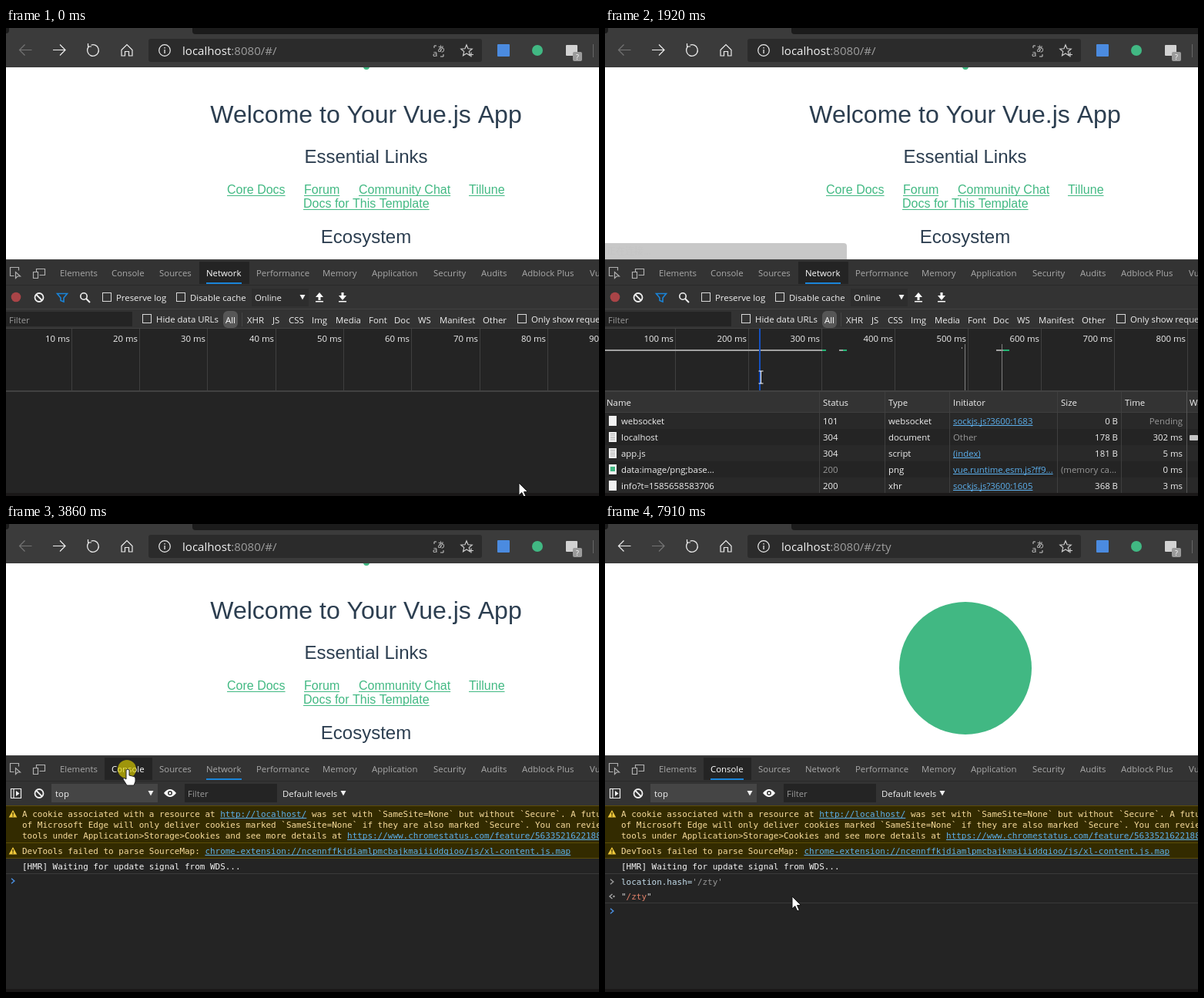
Recreate the animation shown at these times as an HTML page with a canvas. Size 770x607 px, loop 8 s.

```html
<!DOCTYPE html>
<html lang="en">
<head>
<meta charset="utf-8">
<title>Hash change demo</title>
<style>
html, body { margin: 0; width: 100%; height: 100%; overflow: hidden; background: #242424; }
canvas { display: block; }
</style>
</head>
<body>
<canvas id="stage" width="770" height="607"></canvas>
<script>
const ctx = document.getElementById('stage').getContext('2d');
const LOOP = 8000;
const UI = '11.4px "Open Sans", sans-serif';
const URL_FONT = '15.1px "Open Sans", sans-serif';
const MONO = '10.96px "DejaVu Sans Mono", monospace';
const CJK = '12px "Noto Sans CJK SC", "Noto Sans CJK", sans-serif';
const page = size => `${size}px "Liberation Sans", Arial, sans-serif`;
const LIGHT = '#f0f0f0', DIM = '#989898', BAR = '#333333', DARK = '#242424', LINE = '#3f3f3f';
const GREEN = '#41b883', LINK = '#5cb0ee';

// Labels only: a shortened row name and an extension id shown in the console
const IMAGE_LABEL = ['data', 'image/png;base...'].join(':');
const EXTENSION = ['ncennffk', 'jdiamlpm', 'cbajkmai', 'iiddgioo'].join('');

// Cursor moves: start, last step, number of steps, end point
const MOVES = [
  [70, 450, 6, 113, 36],
  [990, 1458, 7, 200, 374],
  [1536, 1770, 4, 203, 470],
  [1840, 1918, 2, 202, 453],
  [1996, 2620, 9, 83, 362],
  [2780, 3020, 4, 43, 350],
  [3248, 3710, 7, 157, 318],
  [4190, 4560, 6, 243, 483]
];
const CLICKS = [[760, 113, 36], [3170, 43, 350], [3860, 157, 318]];

const ROWS = {
  socket: ['websocket', '101', 'websocket', 'sockjs.js?3600:1683', '0 B', 'Pending'],
  doc: ['localhost', '304', 'document', 'Other', '178 B', '302 ms'],
  app: ['app.js', '304', 'script', '(index)', '181 B', '5 ms'],
  image: [IMAGE_LABEL, '200', 'png', 'vue.runtime.esm.js?ff9...', '(memory ca...', '0 ms'],
  info: ['info?t=1585658583706', '200', 'xhr', 'sockjs.js?3600:1605', '368 B', '3 ms']
};
const TABS = [['Elements', 70], ['Console', 137], ['Sources', 199], ['Network', 260], ['Performance', 325],
  ['Memory', 411], ['Application', 475], ['Security', 555], ['Audits', 617], ['Adblock Plus', 670], ['Vue', 758]];
const TYPES = [['XHR', 313], ['JS', 346], ['CSS', 367], ['Img', 397], ['Media', 428], ['Font', 471],
  ['Doc', 504], ['WS', 535], ['Manifest', 563], ['Other', 619]];

const between = (t, a, b) => t >= a && t < b;
const ease = f => f * f * (3 - 2 * f);

function rect(x, y, w, h, color, r = 0) {
  ctx.fillStyle = color;
  ctx.beginPath();
  ctx.roundRect(x, y, w, h, r);
  ctx.fill();
}

function disc(x, y, r, color) {
  ctx.fillStyle = color;
  ctx.beginPath();
  ctx.arc(x, y, r, 0, 7);
  ctx.fill();
}

function ring(x, y, r, color, width = 1.2, from = 0, to = 7) {
  ctx.strokeStyle = color;
  ctx.lineWidth = width;
  ctx.beginPath();
  ctx.arc(x, y, r, from, to);
  ctx.stroke();
}

// d is SVG path syntax, drawn relative to x, y
function path(d, x, y, { fill, stroke, width = 1.2 }) {
  const p = new Path2D(d);
  ctx.save();
  ctx.translate(x, y);
  if (fill) { ctx.fillStyle = fill; ctx.fill(p); }
  if (stroke) { ctx.strokeStyle = stroke; ctx.lineWidth = width; ctx.stroke(p); }
  ctx.restore();
}

function star(x, y, r, color) {
  ctx.strokeStyle = color;
  ctx.lineWidth = 1.2;
  ctx.beginPath();
  for (let k = 0; k < 10; k++) {
    const a = k * Math.PI / 5 - Math.PI / 2, q = k % 2 ? r * .45 : r;
    ctx.lineTo(x + q * Math.cos(a), y + q * Math.sin(a));
  }
  ctx.closePath();
  ctx.stroke();
}

function text(s, x, y, color = LIGHT, font = UI, align = 'left') {
  ctx.font = font;
  ctx.fillStyle = color;
  ctx.textAlign = align;
  ctx.fillText(s, x, y);
  return ctx.measureText(s).width;
}

function link(s, x, y, color = LINK, font = UI, gap = 1) {
  const w = text(s, x, y, color, font);
  rect(x, y + gap, w, 1, color);
  return w;
}

function checkbox(x, y) {
  ctx.strokeStyle = '#d8d8d8';
  ctx.lineWidth = 1;
  ctx.strokeRect(x + .5, y + .5, 11, 11);
}

function arrowDown(x, y) {
  path('M -3.5 -3 H 3.5 L 0 3.5 Z', x, y, { fill: LIGHT });
}

function cursorAt(t) {
  let x = 666, y = 590;
  for (const [start, end, n, tx, ty] of MOVES) {
    if (t < start) break;
    const i = Math.floor((t - start) / ((end - start) / (n - 1)) + 1e-6);
    const f = ease(Math.min(1, (i + 1) / n));
    x += (tx - x) * f;
    y += (ty - y) * f;
  }
  return { x, y };
}

function drawPage(moved) {
  rect(0, 51, 770, 249, '#fff');
  if (moved) {
    disc(468, 187, 86, GREEN);
    return;
  }
  disc(468, 50, 4, GREEN);
  const ink = '#2c3e50', green = '#42b983';
  text('Welcome to Your Vue.js App', 467.5, 123, ink, page(32), 'center');
  text('Essential Links', 467.5, 175, ink, page(24), 'center');
  text('Ecosystem', 467.5, 279, ink, page(24), 'center');
  const links = [['Core Docs', 287, 215], ['Forum', 387, 215], ['Community Chat', 458, 215],
    ['Tillune', 601, 215], ['Docs for This Template', 386, 233]];
  for (const [s, x, y] of links) link(s, x, y, green, page(16), 2);
}

function drawBrowser(t, moved) {
  const on = '#ececec', off = '#747474';
  rect(0, 0, 770, 51, '#3b3b3b');
  rect(242, 0, 528, 8, '#1b1b1b', [0, 0, 0, 4]);
  rect(0, 0, 4, 7, '#1b1b1b', [0, 0, 4, 0]);
  const arrow = 'M 8 0 H -8 M -1 -7 L -8 0 L -1 7';
  path(arrow, 25.5, 28.5, { stroke: moved ? on : off });
  ctx.save();
  ctx.translate(69, 28.5);
  ctx.scale(-1, 1);
  path(arrow, 0, 0, { stroke: moved ? off : on });
  ctx.restore();
  if (between(t, 760, 1770)) {
    path('M -6 -6 L 6 6 M 6 -6 L -6 6', 113, 29, { stroke: on });
  } else {
    ring(113, 29, 7.3, on, 1.3, -1.9, 3.95);
    path('M -6.5 -8 V -4 H -2', 113, 28, { stroke: on });
  }
  path('M -7 0 L 0 -7 L 7 0 V 7.5 H 2.5 V 2 H -2.5 V 7.5 H -7 Z', 157, 28.5, { stroke: on });

  rect(185, 14, 433, 30, '#2b2b2b', 3);
  ring(206, 29, 7.3, on);
  rect(205.4, 28, 1.3, 5, on);
  rect(205.4, 25, 1.3, 1.6, on);
  const w = text('localhost', 229, 35, '#f2f2f2', URL_FONT);
  text(':8080/#/' + (moved ? 'zty' : ''), 229 + w, 35, '#9d9d9d', URL_FONT);
  text('a', 554, 37, '#ccc', UI);
  text('あ', 560, 31, '#ccc', '10px "Noto Sans CJK JP", "Noto Sans CJK", sans-serif');
  path('M 556 26 V 23 H 559 M 568 34 V 37 H 564', 0, 0, { stroke: '#ccc', width: 1 });
  star(598, 29.5, 7.6, '#ccc');
  path('M 3 5 H 9 M 6 2 V 8', 598, 29.5, { stroke: '#ccc' });

  rect(638, 21, 16, 16, '#4b8be0', 1);
  disc(690, 29, 7, between(t, 760, 1692) ? '#8d8d8d' : GREEN);
  rect(727, 22, 15, 14, '#d2d2d2', 1);
  rect(736, 31, 12, 12, '#9b9b9b', 2);
  text('?', 742, 41, '#fff', '9px "Open Sans", sans-serif', 'center');
  rect(762, 21, 1, 17, '#666');
}

function drawBubble(t) {
  if (!between(t, 760, 2000)) return;
  const step = Math.floor((t - 1840) / 78) + 1;
  ctx.globalAlpha = Math.max(0, 1 - .36 * Math.max(0, step));
  rect(0, 279, 314, 21, '#3b3b3b', [0, 4, 0, 0]);
  text('正在连接...', 2, 294, '#bdbdbd', CJK);
  ctx.globalAlpha = 1;
}

function drawTabs(t) {
  const current = t < 3860 ? 'Network' : 'Console';
  rect(0, 300, 770, 33, BAR);
  rect(0, 300, 770, 1, '#474747');
  rect(0, 333, 770, 1, '#292929');
  const [sx, sw] = current === 'Network' ? [251, 65] : [128, 62];
  rect(sx, 303, sw, 29, DARK);
  for (const [s, x] of TABS) text(s, x, 322, s === current ? '#fff' : '#a9a9a9');
  const f = Math.max(0, Math.min(1, Math.floor((t - 3860) / 75) / 2));
  rect(260 - 123 * f, 330, 46 - 3 * f, 2, '#1a84d8');
  path('M 12 5 V 1 H 1 V 12 H 6 M 8 7 V 15 L 10.5 12.5 H 14 Z', 4.5, 309.5, { stroke: '#b0b0b0' });
  path('M 4 5 V 1 H 15 V 9 H 8 M 0 5 H 6 V 13 H 0 Z', 35.5, 311.5, { stroke: '#b0b0b0' });
}

function drawClear() {
  ring(43, 349.5, 5.5, LIGHT, 1.8);
  path('M -4 -4 L 4 4', 43, 349.5, { stroke: LIGHT, width: 1.8 });
}

function drawNetworkBars() {
  rect(0, 334, 770, 56, BAR);
  rect(0, 364, 770, 1, '#414141');
  disc(13, 349, 6.3, '#a94447');
  drawClear();
  path('M -6.5 -5 H 6.5 L 2 0.5 V 5.5 L -2 4 V 0.5 Z', 73, 349.5, { stroke: '#1a84d8', width: 1.6 });
  ring(101, 348, 4.2, LIGHT, 1.6);
  path('M 104 351 L 109 356', 0, 0, { stroke: LIGHT, width: 2 });
  checkbox(125, 343);
  text('Preserve log', 143, 354);
  checkbox(221, 343);
  text('Disable cache', 239, 354);
  rect(319, 338, 74, 23, '#2d2d2d');
  text('Online', 323, 354);
  arrowDown(385, 349);
  path('M 0 -6 L 5 0 H 1.5 V 4 H -1.5 V 0 H -5 Z', 407, 349, { fill: '#fff' });
  path('M 0 4 L 5 -2 H 1.5 V -6 H -1.5 V -2 H -5 Z', 437, 349, { fill: '#fff' });
  for (const x of [402, 432]) rect(x, 354, 10, 1.5, '#fff');

  rect(0, 368, 164, 19, DARK);
  text('Filter', 4, 383, DIM);
  checkbox(177, 371);
  text('Hide data URLs', 195, 382);
  rect(282, 367, 19, 22, '#565656', 6);
  text('All', 291.5, 383, '#fff', UI, 'center');
  rect(306, 369, 1, 18, '#444');
  for (const [s, x] of TYPES) text(s, x, 383);
  checkbox(664, 371);
  text('Only show requests', 682, 382);
  rect(0, 389, 770, 1, '#414141');
}

function drawTimeline(count) {
  const [gap, unit] = { 0: [88.3, 10], 2: [115.8, 50], 5: [95, 100] }[count];
  for (let k = 1; k < 10; k++) {
    const x = Math.round(k * gap - 3.6);
    rect(x, 390, 1, 80, LINE);
    text(`${k * unit} ms`, x - 2, 407, LIGHT, UI, 'right');
  }
  rect(0, 470, 770, 2, '#414141');
  const gray = '#a2a2a2', green = '#21b573';
  const bar = (x, mid, end) => {
    rect(x, 417, mid - x, 2, gray);
    rect(mid, 417, end - mid, 2, green);
  };
  if (count === 2) {
    bar(0, 698, 703);
    bar(747, 760, 770);
    rect(0, 417, 1, 2, green);
  }
  if (count === 5) {
    bar(0, 282, 287);
    bar(304, 309, 314);
    bar(508, 517, 525);
    rect(463, 414, 1, 2, gray);
    for (const x of [467, 515]) rect(x, 410, 1, 60, '#808080');
  }
}

function drawTable(names) {
  if (!names.length) return;
  rect(0, 472, 770, 27, BAR);
  rect(0, 498, 770, 1, LINE);
  names.forEach((name, i) => {
    const y = 499 + i * 21, base = y + 15;
    rect(0, y, 770, 21, i % 2 ? DARK : '#292929');
    const [file, status, type, initiator, size, time] = ROWS[name];
    rect(5, y + 4, 10, 13, '#f2f2f2');
    if (name === 'image') rect(7, y + 7, 6, 6, GREEN);
    else if (name === 'doc' || name === 'app')
      for (let k = 0; k < 4; k++) rect(7, y + 6 + k * 2.5, 6, 1, '#aaa');
    text(file, 21, base);
    text(status, 283, base, name === 'image' ? DIM : LIGHT);
    text(type, 368, base);
    if (name === 'doc') {
      text(initiator, 452, base, DIM);
      rect(759, y + 8, 11, 7, '#c4c4c4', 1);
    } else link(initiator, 452, base);
    if (name === 'image') text(size, 592, base, DIM);
    else text(size, 666, base, LIGHT, UI, 'right');
    text(time, 750, base, name === 'socket' ? DIM : LIGHT, UI, 'right');
  });
  const heads = [['Name', 2], ['Status', 283], ['Type', 368], ['Initiator', 452], ['Size', 592], ['Time', 675], ['Waterfall', 759]];
  for (const [s, x] of heads) text(s, x, 490);
  for (const x of [278, 363, 447, 587, 670, 755]) rect(x, 472, 1, 132, x === 755 ? '#565656' : LINE);
}

function tooltip(s, x, y, w, h) {
  rect(x, y, w, h, 'rgba(42,42,42,.82)');
  text(s, x + 9, y + h - 7, '#a0a0a0');
}

function drawNetwork(t, cur) {
  const names = between(t, 1302, 1614) ? ['doc', 'app']
    : between(t, 1614, 3170) ? Object.keys(ROWS) : [];
  drawNetworkBars();
  drawTimeline(names.length);
  drawTable(names);
  if (onTimeline(t, cur)) rect(cur.x - 2, 390, 2, 80, '#1550c0');
  if (between(t, 1458, 1536)) tooltip('Hides data: and blob: URLs', 208, 381, 160, 23);
  if (between(t, 2710, 2780)) tooltip('Search', 89, 367, 45, 21);
}

function warning(y) {
  path('M 0 -5 L 5.3 4.5 H -5.3 Z', 9, y, { fill: '#f0c83c' });
  rect(8.4, y - 2, 1.3, 3.4, '#332b00');
  rect(8.4, y + 2.2, 1.3, 1.2, '#332b00');
}

const chevron = (y, color) => path('M -2 -3.2 L 1.8 0 L -2 3.2', 9, y, { stroke: color, width: 1.5 });

function code(s, y) {
  const [name, value = ''] = s.split(/(?<==)/);
  const w = text(name, 21, y, '#c3dcea', MONO);
  text(value, 21 + w, y, '#969696', MONO);
}

function drawConsole(t) {
  rect(0, 334, 770, 31, BAR);
  path('M 0 0 H 13 V 12 H 0 Z M 3.5 0 V 12', 6.5, 343.5, { stroke: LIGHT });
  path('M 0 -3.5 L 4.5 0 L 0 3.5 Z', 13, 349.5, { fill: LIGHT });
  drawClear();
  rect(59, 337, 138, 24, '#454545');
  text('top', 64, 354);
  arrowDown(188, 349);
  path('M -8 0 Q 0 -10 8 0 Q 0 10 -8 0 Z', 213, 349, { fill: '#fff' });
  disc(213, 349, 3, BAR);
  disc(213, 349, 1.5, '#fff');
  rect(232, 337, 120, 24, DARK);
  text('Filter', 236, 354, DIM);
  text('Default levels', 359, 354);
  arrowDown(438, 349);

  const warm = '#f8dc9c';
  rect(0, 365, 770, 69, '#332b00');
  for (const y of [365, 413, 433]) rect(0, y, 770, 1, '#5c4d08');
  warning(376);
  warning(424);
  let x = 21 + text('A cookie associated with a resource at ', 21, 380, warm, MONO);
  x += link('http://localhost/', x, 380, LINK, MONO);
  text(' was set with `SameSite=None` but without `Secure`. A future release', x, 380, warm, MONO);
  text('of Microsoft Edge will only deliver cookies marked `SameSite=None` if they are also marked `Secure`. You can review cookies', 21, 394, warm, MONO);
  x = 21 + text('tools under Application>Storage>Cookies and see more details at ', 21, 408, warm, MONO);
  link('https://www.chromestatus.com/feature/5633521622188032', x, 408, LINK, MONO);
  x = 21 + text('DevTools failed to parse SourceMap: ', 21, 428, warm, MONO);
  link(`chrome-extension://${EXTENSION}/js/xl-content.js.map`, x, 428, LINK, MONO);
  text('[HMR] Waiting for update signal from WDS...', 21, 448, '#f4f4f4', MONO);
  rect(0, 453, 770, 1, '#3a3a3a');
  drawPrompt(t);
}

function drawPrompt(t) {
  const blue = '#4a8fe0', command = "location.hash='/zty'", reply = 'M 2.5 -3 L -1 0 L 2.5 3';
  const blinkOn = between(t, 4010, 4560) || between(t, 5100, 5800) || between(t, 6200, 6730) || between(t, 7270, 7910);
  let typed = '', top = 456;
  if (t >= 7270) {
    chevron(464, '#999');
    code(command, 468);
    path(reply, 7, 483, { stroke: '#aaa', width: 1.3 });
    disc(11.5, 483, 1.2, '#aaa');
    const q = text('"', 21, 487, '#ddd', MONO);
    const w = text('/zty', 21 + q, 487, '#e2826a', MONO);
    text('"', 21 + q + w, 487, '#ddd', MONO);
    rect(0, 491, 770, 1, '#3a3a3a');
    top = 495;
  } else if (t >= 6200) {
    typed = command;
  } else if (t >= 5270) {
    typed = 'location.hash';
    path(reply, 7, 482, { stroke: '#777', width: 1.3 });
    text('"#/"', 21, 486, '#8a8a8a', MONO);
  }
  chevron(top + 7, blue);
  code(typed, top + 11);
  if (blinkOn) rect(21 + Math.round(typed.length * 6.6), top, 1, 14, '#fff');
}

const onTimeline = (t, { y }) => t < 3860 && y >= 392 && y < 469;

function drawClicks(t) {
  for (const [start, x, y] of CLICKS) {
    if (!between(t, start, start + 150)) continue;
    disc(x, y, 12, `rgba(225,210,0,${t < start + 75 ? .65 : .35})`);
  }
}

function drawCursor(t, cur) {
  const { x, y } = cur;
  if (onTimeline(t, cur)) {
    path('M -3 -8 H 3 M 0 -8 V 8 M -3 8 H 3', x + .5, y, { stroke: '#fff', width: 1 });
  } else if (between(t, 3500, 4300) && between(y, 303, 333)) {
    path('M -2 1 Q 0 -1 2 1 V 8 L 8 9.5 Q 10 10 10 12 V 16 L 8 21 H -1 L -6 13 Q -6 10 -2 13 Z', x + 1, y, { fill: '#fff', stroke: '#222', width: 1 });
  } else {
    path('M 0 0 V 16 L 3.8 12.6 L 6.7 19 L 9.3 17.8 L 6.5 11.6 H 11.5 Z', x, y, { fill: '#fff', stroke: '#111', width: 1 });
  }
}

function draw(t) {
  const cur = cursorAt(t), moved = t >= 7350;
  rect(0, 0, 770, 607, DARK);
  drawPage(moved);
  drawBrowser(t, moved);
  drawBubble(t);
  drawTabs(t);
  if (t < 3860) drawNetwork(t, cur);
  else drawConsole(t);
  rect(0, 603, 770, 4, '#1a1818');
  drawClicks(t);
  drawCursor(t, cur);
}

const begin = performance.now();
function tick() {
  draw((performance.now() - begin) % LOOP);
  requestAnimationFrame(tick);
}
tick();
</script>
</body>
</html>
```
